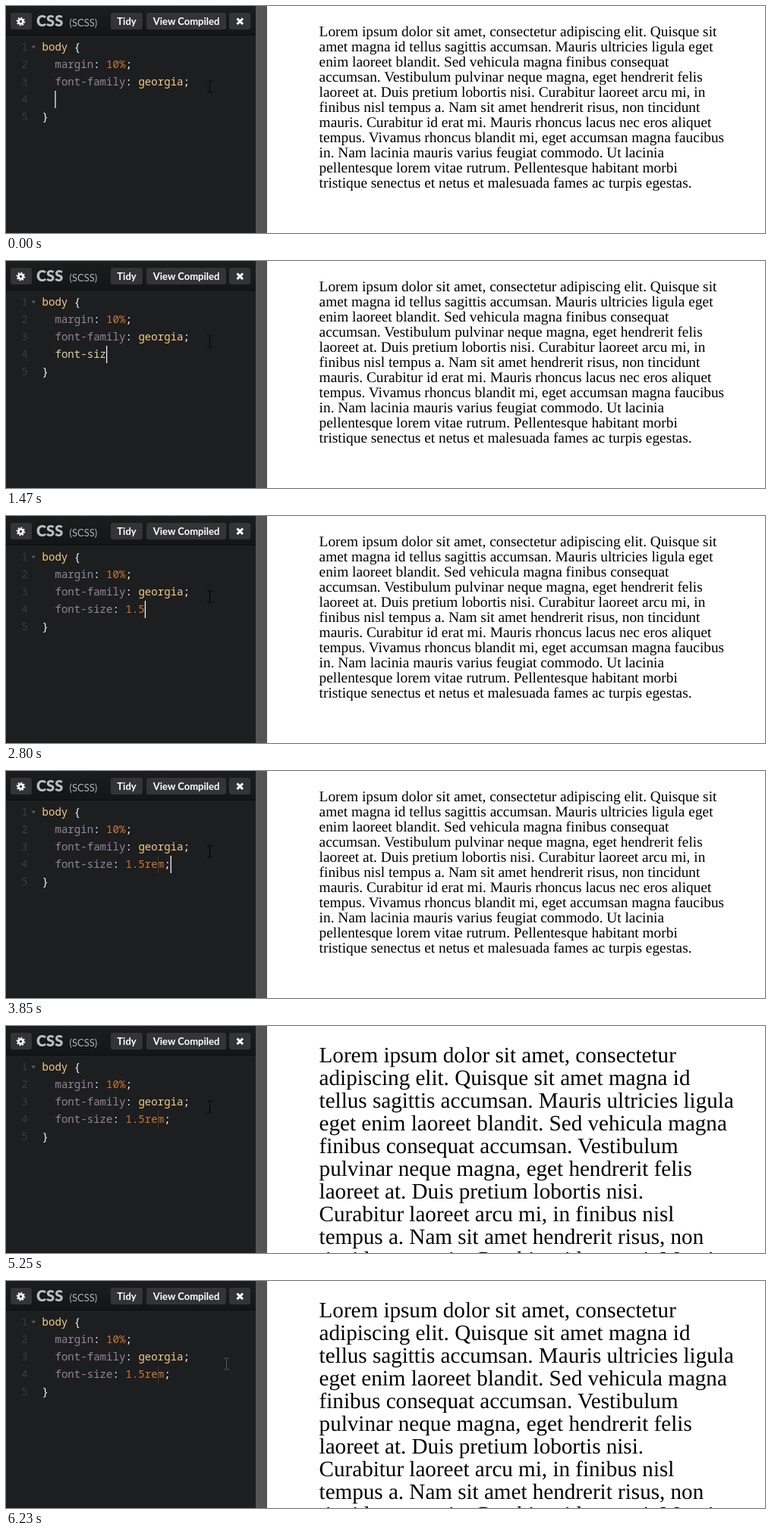
An HTML page for the animation above (6.44 s loop, 1000x300 px).

```html
<!DOCTYPE html>
<html lang="en">
<head>
<meta charset="utf-8">
<title>Live CSS editing</title>
<style>
  html, body { margin: 0; width: 100%; height: 100%; overflow: hidden; background: #fff; }
  svg { display: block; width: 100%; height: 100%; }
  text { white-space: pre; }
  .ui { font-family: Lato, sans-serif; font-weight: 700; font-size: 13px; fill: #fff; }
  .code { font-family: "Noto Sans Mono", "DejaVu Sans Mono", monospace; font-size: 14.1px; fill: #f8f8f8; }
  .page { font-family: "Liberation Serif", serif; fill: #000; text-rendering: geometricPrecision; }
  .num { fill: #3a3b3d; }
  .tag { fill: #f3cd83; }
  .prop { fill: #968596; }
  .value { fill: #cc7832; }
  .draft { fill: #e0d49c; }
  .beam { fill: none; stroke-width: 1; }
</style>
</head>
<body>
<svg viewBox="0 0 1000 300" preserveAspectRatio="none">
  <defs>
    <linearGradient id="bar" x2="0" y2="1">
      <stop offset="0" stop-color="#1c1d1f"/>
      <stop offset="1" stop-color="#141517"/>
    </linearGradient>
    <path id="beam" d="M-3.5 -7.5h3m1 0h3M0 -7V7M-3.5 7.5h3m1 0h3"/>
  </defs>
  <rect width="1000" height="300" fill="#fff"/>
  <rect width="329" height="300" fill="#1d1e20"/>
  <rect width="329" height="38" fill="url(#bar)"/>
  <rect y="38" width="329" height="1" fill="#0c0d0e"/>
  <rect x="329" width="15" height="300" fill="#555"/>

  <g fill="#343436">
    <rect x="6" y="9" width="28" height="22" rx="3"/>
    <rect x="138" y="9" width="42" height="22" rx="3"/>
    <rect x="185" y="9" width="105" height="22" rx="3"/>
    <rect x="294" y="9" width="28" height="22" rx="3"/>
  </g>
  <g fill="none" stroke="#fff">
    <circle cx="19.5" cy="20.5" r="3" stroke-width="2.6"/>
    <circle cx="19.5" cy="20.5" r="4.9" stroke-width="1.8" pathLength="16" stroke-dasharray="1 1"/>
    <path d="M304.5 16.5l7.5 7.5m0 -7.5l-7.5 7.5" stroke-width="3"/>
  </g>
  <g class="ui">
    <text x="40" y="27" style="font-size:20px;font-weight:900;fill:#b9bec0">CSS</text>
    <text x="83.5" y="26.5" style="font-weight:400;fill:#b0b4b6">(SCSS)</text>
    <text x="159" y="24.5" text-anchor="middle">Tidy</text>
    <text x="237.5" y="24.5" text-anchor="middle">View Compiled</text>
  </g>

  <path d="M33.5 52.5h5.5l-2.75 4z" fill="#5a5b5d"/>
  <g class="code" id="code"></g>
  <rect id="trail" x="200" y="112" width="1" height="23" fill="#54301c"/>
  <rect id="caret" y="112" width="1.2" height="23" fill="#fff"/>
  <g class="page" id="small" font-size="19.35"></g>
  <g class="page" id="big" font-size="29.1"></g>
  <use id="ghost" class="beam" href="#beam" x="290.5" y="109.5" stroke="#5a5b5d"/>
  <use id="mouse" class="beam" href="#beam" stroke="#000"/>
</svg>

<script>
const LOOP = 6440, LEFT = 47.5, ADVANCE = 8.46, INDENT = 64.4;
const byId = id => document.getElementById(id);
const show = (el, on) => el.setAttribute('visibility', on ? 'visible' : 'hidden');

function addText(parent, x, y, text = '') {
  const el = document.createElementNS('http://www.w3.org/2000/svg', 'text');
  el.setAttribute('x', x);
  el.setAttribute('y', y);
  el.textContent = text;
  return parent.appendChild(el);
}

// Code panel
const span = (name, text) => `<tspan class="${name}">${text}</tspan>`;
const codeLines = [
  span('tag', 'body') + ' {',
  '  ' + span('prop', 'margin') + ': ' + span('value', '10%') + ';',
  '  ' + span('prop', 'font-family') + ': ' + span('tag', 'georgia') + ';',
  '',
  '}'
].map((html, i) => {
  const y = 59 + 23 * i;
  addText(byId('code'), 20.3, y, i + 1).setAttribute('class', 'num');
  const line = addText(byId('code'), LEFT, y);
  line.innerHTML = html;
  return line;
});
const typedLine = codeLines[3];

function colourTyped(text) {
  const [prop, value] = text.split(':');
  const known = prop === 'font' || prop === 'font-size';
  let html = '  ' + span(known ? 'prop' : 'draft', prop);
  if (value !== undefined) {
    html += ':' + span('value', value.replace(';', '')) + (value.endsWith(';') ? ';' : '');
  }
  return html;
}

// Page text, wrapped by number of words per line
const words = `Lorem ipsum dolor sit amet, consectetur adipiscing elit. Quisque sit
amet magna id tellus sagittis accumsan. Mauris ultricies ligula eget
enim laoreet blandit. Sed vehicula magna finibus consequat
accumsan. Vestibulum pulvinar neque magna, eget hendrerit felis
laoreet at. Duis pretium lobortis nisi. Curabitur laoreet arcu mi, in
finibus nisl tempus a. Nam sit amet hendrerit risus, non tincidunt
mauris. Curabitur id erat mi. Mauris rhoncus lacus nec eros aliquet
tempus. Vivamus rhoncus blandit mi, eget accumsan magna faucibus
in. Nam lacinia mauris varius feugiat commodo. Ut lacinia
pellentesque lorem vitae rutrum. Pellentesque habitant morbi
tristique senectus et netus et malesuada fames ac turpis egestas.`.split(/\s+/);

function wrap(parent, counts, top, leading) {
  let at = 0;
  counts.forEach((n, i) => {
    addText(parent, 412.6, top + i * leading, words.slice(at, at += n).join(' '));
  });
}
wrap(byId('small'), [10, 10, 8, 8, 11, 11, 11, 9, 9, 7, 10], 40, 20);
wrap(byId('big'), [6, 7, 6, 7, 4, 6, 6, 7, 8, 7], 48, 30);

// Keystroke times, one per character, and caret blinks
const TYPED = 'font-size: 1.5rem;';
const keys = [560, 700, 840, 980, 1050, 1260, 1330, 1470, 1540, 1680, 1890,
  2450, 2660, 2800, 3430, 3500, 3640, 3850];
const hidden = [[420, 560], [2380, 2450], [3290, 3430], [4340, 4760], [5250, 5740], [6230, LOOP]];
const RESIZE = 4340, LEAVE = 5460, GONE = 5880, STEP = 70;

let lastCount = -1;
function draw(t) {
  const count = keys.filter(k => k <= t).length;
  if (count !== lastCount) {
    typedLine.innerHTML = colourTyped(TYPED.slice(0, count));
    byId('caret').setAttribute('x', INDENT + count * ADVANCE);
    lastCount = count;
  }
  show(byId('caret'), !hidden.some(([a, b]) => t >= a && t < b));
  show(byId('trail'), t >= 3640);
  show(byId('small'), t < RESIZE);
  show(byId('big'), t >= RESIZE);

  // The pointer speeds off to the lower right, leaving a faint mark
  let x = 268.5, y = 106.5;
  if (t >= LEAVE) {
    const p = Math.min(1, Math.floor((t - LEAVE) / STEP) / 5);
    const ease = p * p * (3 - 2 * p);
    x = 290.5 + Math.round(682 * ease);
    y = 109.5 + Math.round(181 * ease);
  }
  byId('mouse').setAttribute('x', x);
  byId('mouse').setAttribute('y', y);
  show(byId('mouse'), t < GONE);
  show(byId('ghost'), t >= LEAVE + STEP);
}

const start = performance.now();
function tick() {
  draw((performance.now() - start) % LOOP);
  requestAnimationFrame(tick);
}
tick();
</script>
</body>
</html>
```
